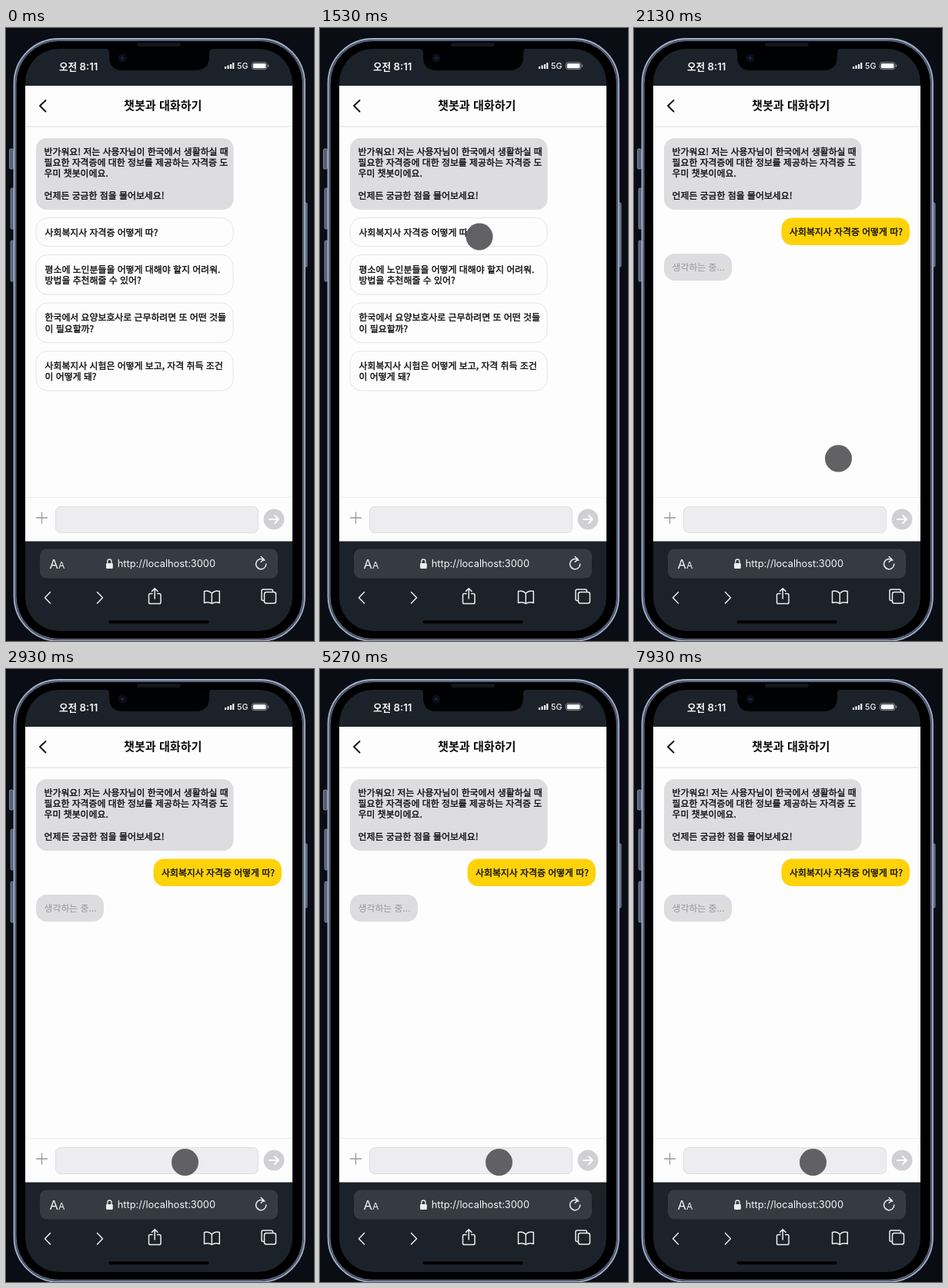
Animation of 400 by 796 pixels, one loop 8000 ms. Source, as an HTML page:

```html
<!DOCTYPE html>
<html lang="ko">
<head>
<meta charset="utf-8">
<title>챗봇과 대화하기</title>
<style>
  html, body { margin: 0; width: 100%; height: 100%; overflow: hidden; background: #0a0d13; }
  svg { display: block; width: 100%; height: 100%; }
  text { font: 500 11.9px "Noto Sans CJK KR", "Noto Sans CJK", sans-serif; fill: #0c0c0e; white-space: pre; }
  .body-text text { stroke: #0c0c0e; stroke-width: .35; }
  .latin { font-family: Inter, "Noto Sans CJK KR", sans-serif; fill: #f5f6f8; }
  .line { fill: none; stroke-linecap: round; stroke-linejoin: round; }
  .bar { stroke: #eceef1; stroke-width: 1.5; }
  .option { fill: #fdfdfe; stroke: #e4e4e8; }
  .bubble { fill: #dddde0; }
</style>
</head>
<body>
<svg viewBox="0 0 400 796" preserveAspectRatio="none">
  <rect width="400" height="796" fill="#0a0d13"/>

  <!-- Phone body -->
  <g fill="#566178" stroke="#8d9ab6" stroke-width=".8">
    <rect x="4.5" y="157" width="5" height="26" rx="1.5"/>
    <rect x="6" y="208" width="4" height="53" rx="1.5"/>
    <rect x="6" y="276" width="4" height="53" rx="1.5"/>
    <rect x="388" y="227" width="3" height="83" rx="1.2"/>
  </g>
  <rect x="10.5" y="14" width="377.5" height="782" rx="58" fill="#434d62" stroke="#a3b0ca" stroke-width="1.8"/>
  <rect x="13" y="16.5" width="372.5" height="777" rx="55.5" fill="#000" stroke="#6c7890"/>
  <rect x="25" y="27" width="347" height="756" rx="44" fill="#1c2229"/>
  <path d="M130 27H268Q264 27 264 32V37Q264 55 246 55H152Q134 55 134 37V32Q134 27 130 27Z" fill="#000103"/>
  <rect x="170" y="19" width="57" height="5" rx="2.5" fill="#14161c"/>
  <circle cx="151" cy="39" r="5.5" fill="#0b0e18"/>
  <circle cx="151" cy="39" r="2" fill="#1b2238"/>

  <!-- Status bar -->
  <text x="69" y="54.5" style="font-size:12.6px;font-weight:600;fill:#f5f6f8">오전</text>
  <text class="latin" x="95.5" y="54.8" style="font-size:13.2px;font-weight:600">8:11</text>
  <path d="M285 50v3M288.5 48.5v4.5M292 47v6M295.2 45v8" fill="none" stroke="#f5f6f8" stroke-width="2.2"/>
  <text class="latin" x="300" y="53.3" style="font-size:10.6px;font-weight:500">5G</text>
  <rect x="319.4" y="44.6" width="19.5" height="9" rx="2.8" fill="none" stroke="#868b92"/>
  <rect x="320.8" y="46" width="16.7" height="6.2" rx="1.5" fill="#fff"/>
  <path d="M340.6 47.5v3.2" stroke="#868b92" stroke-width="1.2"/>

  <!-- Page -->
  <rect x="25" y="75" width="347" height="591.5" fill="#fdfdfe"/>
  <path d="M25 128H372" stroke="#dddde0"/>
  <path class="line" d="M51.5 94L44 101L51.5 108.5" stroke="#0c0c0e" stroke-width="1.9"/>
  <text x="153" y="106.3" style="font-size:15.1px;font-weight:700">챗봇과 대화하기</text>
  <rect class="bubble" x="39" y="143" width="256.5" height="93" rx="14"/>
  <g id="greeting" class="body-text"></g>
  <g id="options" class="body-text"></g>
  <g id="reply">
    <rect x="191.5" y="246.5" width="166.5" height="35.5" rx="14" fill="#ffd20a"/>
    <g class="body-text"><text x="202" y="268.6">사회복지사 자격증 어떻게 따?</text></g>
    <rect class="bubble" x="39" y="293" width="88" height="35" rx="14"/>
    <text x="49.5" y="314.6" style="fill:#96969a">생각하는 중...</text>
  </g>

  <!-- Message field -->
  <path d="M25 609.5H372" stroke="#ededf0"/>
  <path class="line" d="M39.5 636H53.5M46.5 629V643" stroke="#98989c" stroke-width="1.3"/>
  <rect x="64.5" y="621.5" width="263" height="34" rx="6.5" fill="#ededef" stroke="#dfdfe3"/>
  <circle cx="348" cy="638" r="13.4" fill="#d0d0d3"/>
  <path class="line" d="M342 638H354M349 633L354 638L349 643" stroke="#fff" stroke-width="1.8"/>

  <!-- Browser bar -->
  <rect x="44" y="676.5" width="309" height="38" rx="8.5" fill="#363b43"/>
  <text class="latin" x="56.5" y="702" style="font-size:16.5px;font-weight:400">A<tspan style="font-size:12.2px">A</tspan></text>
  <rect x="130" y="695" width="8.8" height="7" rx="1.2" fill="#eceef1"/>
  <path class="line" d="M131.8 695v-2.4a2.6 2.6 0 0 1 5.2 0V695" stroke="#eceef1" stroke-width="1.3"/>
  <text class="latin" x="144.8" y="700.3" style="font-size:12.8px;font-weight:400">http://localhost:3000</text>
  <g class="line bar">
    <path d="M335.8 691.3A6.6 6.6 0 1 0 337.8 696M331.2 686.5L335 690L331.2 693.3"/>
    <path d="M57.5 732.5L50.5 739.8L57.5 747"/>
    <path d="M118.5 732.5L125.5 739.8L118.5 747"/>
    <path d="M190 734.5H187.3Q185.5 734.5 185.5 736.3V745.7Q185.5 747.5 187.3 747.5H199.2Q201 747.5 201 745.7V736.3Q201 734.5 199.2 734.5H196.5M193.2 741V728M189.5 731.4L193.2 727.7L196.9 731.4"/>
    <path d="M267.3 734Q263 729.5 257.5 731.5V746.5Q263 744.5 267.3 747.5Q271.6 744.5 277.3 746.5V731.5Q271.6 729.5 267.3 734V747.5"/>
    <rect x="335.5" y="732.5" width="15" height="14.5" rx="2.5"/>
    <path d="M335.3 743.5H334Q332 743.5 332 741.5V731Q332 729 334 729H344.5Q346.5 729 346.5 731V732.3"/>
  </g>
  <rect x="133.5" y="769.3" width="130" height="4" rx="2" fill="#000"/>

  <circle id="pointer" r="17.5" fill="#5d5d60" fill-opacity=".97"/>
</svg>
<script>
const LOOP = 8000, TAP = 1800, ENTER = 1000;
const find = id => document.getElementById(id);

function add(parent, tag, attrs, content = '') {
  const node = document.createElementNS('http://www.w3.org/2000/svg', tag);
  for (const key in attrs) node.setAttribute(key, attrs[key]);
  node.textContent = content;
  parent.append(node);
}

function addLines(parent, x, y, lines) {
  lines.forEach((line, i) => add(parent, 'text', { x, y: y + i * 14.4 }, line));
}

addLines(find('greeting'), 49.5, 164.6, [
  '반가워요! 저는 사용자님이 한국에서 생활하실 때',
  '필요한 자격증에 대한 정보를 제공하는 자격증 도',
  '우미 챗봇이에요.',
  '',
  '언제든 궁금한 점을 물어보세요!'
]);

const options = [
  [246.5, 37, '사회복지사 자격증 어떻게 따?'],
  [294.5, 51.5, '평소에 노인분들을 어떻게 대해야 할지 어려워.', '방법을 추천해줄 수 있어?'],
  [357, 51.5, '한국에서 요양보호사로 근무하려면 또 어떤 것들', '이 필요할까?'],
  [419.5, 51.5, '사회복지사 시험은 어떻게 보고, 자격 취득 조건', '이 어떻게 돼?']
];
for (const [y, height, ...lines] of options) {
  add(find('options'), 'rect', { class: 'option', x: 39, y, width: 256, height, rx: 15 });
  addLines(find('options'), 50.5, y + 23.2, lines);
}

// Time, x, y
const path = [
  [ENTER, 345, 440],
  [1400, 207, 271],
  [1830, 207, 271],
  [2100, 265.5, 559],
  [2200, 265.5, 559],
  [2520, 232.5, 640.5],
  [LOOP, 232.5, 640.5]
];

const ease = u => u * u * (3 - 2 * u);

function pointerAt(t) {
  const i = Math.max(1, path.findIndex(p => p[0] >= t));
  const [t0, x0, y0] = path[i - 1], [t1, x1, y1] = path[i];
  const u = ease(Math.max(0, (t - t0) / (t1 - t0)));
  return [x0 + (x1 - x0) * u, y0 + (y1 - y0) * u];
}

const show = (id, on) => { find(id).style.visibility = on ? 'visible' : 'hidden'; };
const start = performance.now();

function draw(now) {
  const t = Math.max(0, now - start) % LOOP;
  show('options', t < TAP);
  show('reply', t >= TAP);
  show('pointer', t >= ENTER);
  find('pointer').setAttribute('transform', `translate(${pointerAt(t)})`);
  requestAnimationFrame(draw);
}
draw(start);
</script>
</body>
</html>
```
